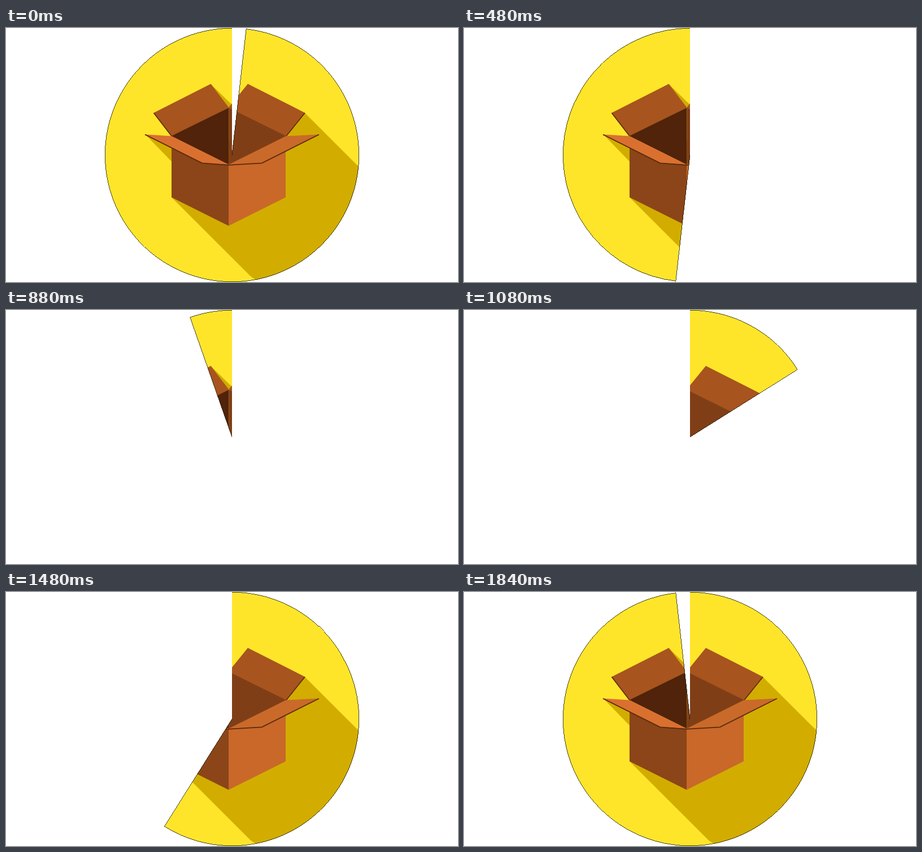
An HTML page for the animation above (1880 ms loop, 800x450 px).

```html
<!DOCTYPE html>
<html lang="en">
<head>
<meta charset="utf-8">
<title>Box wipe</title>
<style>
  html, body { margin: 0; width: 100%; height: 100%; overflow: hidden; background: #fff; }
  svg { display: block; width: 100vw; height: 100vh; }
</style>
</head>
<body>
<svg viewBox="0 0 800 450">
  <defs>
    <clipPath id="wedge"><path id="sector"/></clipPath>
  </defs>
  <g clip-path="url(#wedge)">
    <rect x="175" width="450" height="450" fill="#ffe52a"/>
    <g fill="#d2ad00">
      <path d="M529 150.5L640 261.5V460H460L443 446Q437 444 432 439L293 300L394 200Z"/>
      <path d="M362 99L400 136L394 141Z"/>
      <path d="M246 188L293 236.500V210Z"/>
    </g>
    <!-- back flaps -->
    <path d="M362.500 99L261 150.500L293 192L394.500 141Z" fill="#a8541e"/>
    <path d="M428 99L529.500 150.500L496 192L394 141Z" fill="#a8541e"/>
    <path d="M261.500 150.500L293 191.500M529 150.500L496 191.500" stroke="#5a2a0c" stroke-width="1.600"/>
    <!-- inside -->
    <path d="M292.500 191.500L394.500 141V242.500Z" fill="#50230a"/>
    <path d="M394.500 141L496 191.500L394.500 242.500Z" fill="#803e17"/>
    <!-- front faces -->
    <path d="M293 205V300L394 350.500V242Z" fill="#8b4518"/>
    <path d="M394 242L495 210V300L394 350.500Z" fill="#c96829"/>
    <!-- front flaps -->
    <path d="M246 188.500L293 191.500L394.500 242L347 239Z" fill="#da7030"/>
    <path d="M554 188.500L496 191.500L394 242L453 239Z" fill="#c96a2a"/>
    <path d="M246 188.800L347 239.300L394 242.800L453 239.300L554 188.800" fill="none" stroke="#5a2a0c" stroke-width="1.800"/>
  </g>
  <path id="rim" fill="none" stroke="#000" stroke-width=".7" shape-rendering="crispEdges"/>
</svg>
<script>
  const LOOP = 1880, TICK = 40, STEPS = 56, STEPS_PER_TICK = 2.4;
  const CX = 400, CY = 225;
  const sector = document.getElementById('sector');
  const rim = document.getElementById('rim');

  // Centre, out along the moving edge, then round the arc to the top.
  function outline(angle, closing, r) {
    const x = CX + r * Math.sin(angle), y = CY - r * Math.cos(angle);
    const span = closing ? 2 * Math.PI - angle : angle;
    const large = span > Math.PI ? 1 : 0;
    return `M${CX} ${CY}L${x} ${y}A${r} ${r} 0 ${large} ${closing ? 1 : 0} ${CX} ${CY - r}`;
  }

  function draw(ms) {
    const tick = Math.floor((ms % LOOP) / TICK);
    const step = Math.floor(tick * STEPS_PER_TICK + 1e-6) + 1;
    const closing = step < STEPS;
    const angle = (step % STEPS) / STEPS * 2 * Math.PI;
    const empty = step === STEPS;
    sector.setAttribute('d', empty ? '' : outline(angle, closing, 225) + 'Z');
    rim.setAttribute('d', empty ? '' : outline(angle, closing, 224.7));
  }

  const start = performance.now();
  function loop() {
    draw(performance.now() - start);
    requestAnimationFrame(loop);
  }
  loop();
</script>
</body>
</html>
```
